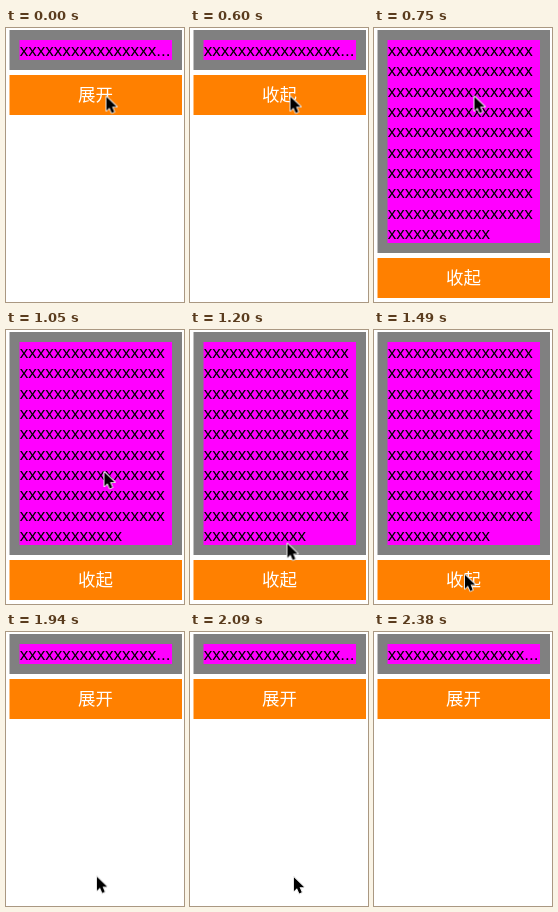
Animation of 178 by 274 pixels, one loop 2.7 s. Source, as an HTML page:

```html
<!DOCTYPE html>
<html lang="zh-CN">
<head>
<meta charset="utf-8">
<style>
  html, body { margin: 0; width: 100%; height: 100%; overflow: hidden; background: #fff; }
  .stage { position: relative; width: 178px; height: 274px; overflow: hidden; }
  .stage * { position: absolute; box-sizing: border-box; }

  .panel, .button, .open, .label, .short, .cursor { animation: 2700ms step-end infinite; }

  /* half-covered pixel column on the left edge */
  .panel, .button { left: 3px; width: 173px; height: 40px; border-left: 1px solid #ffffff80; }
  .panel { top: 2px; background: #808080; animation-name: panel; }
  .text {
    left: 9px; top: 10px; right: 10px; bottom: 10px;
    overflow: hidden; border-left: 1px solid #80808080; background: #f0f; color: #000;
    font: 17.07px/20.33px "Liberation Sans", Arial, sans-serif;
    word-break: break-all;
  }
  .text span { left: -.3px; top: 1px; width: 152px; }

  .button { top: 47px; background: #ff8000; animation-name: button; }
  .button span {
    left: -1px; top: 0; width: 173px; text-align: center; color: #fff;
    font: 17.5px/38px "Noto Sans CJK SC", "Noto Sans CJK", sans-serif;
  }

  .short { animation-name: short; }
  .open { animation-name: open; }
  .expand { animation-name: expand; }
  .collapse { animation-name: collapse; }
  .cursor { left: 0; top: 0; width: 16px; height: 22px; overflow: visible; animation-name: move; }

  @keyframes panel  { 0%, 71.851% { height: 40px } 27.777% { height: 223px } }
  @keyframes button { 0%, 71.851% { top: 47px } 27.777% { top: 230px } }
  @keyframes short  { 0%, 71.851% { visibility: visible } 27.777% { visibility: hidden } }
  @keyframes open   { 0%, 71.851% { visibility: hidden } 27.777% { visibility: visible } }
  @keyframes expand   { 0%, 71.851% { visibility: visible } 22.222% { visibility: hidden } }
  @keyframes collapse { 0%, 71.851% { visibility: hidden } 22.222% { visibility: visible } }
  @keyframes move {
    0%      { transform: translate(99.5px, 67.5px); visibility: visible }
    38.888% { transform: translate(97.5px, 141px) }
    44.444% { transform: translate(96.5px, 212.5px) }
    50%     { transform: translate(91.5px, 233px) }
    55.185% { transform: translate(90px, 243.5px) }
    77.407% { transform: translate(103px, 244px) }
    82.962% { transform: translate(146px, 258px); visibility: visible }
    88.148%, 100% { transform: translate(146px, 258px); visibility: hidden }
  }
</style>
</head>
<body>
<div class="stage">
  <div class="panel">
    <div class="text"><span class="short"></span><span class="open"></span></div>
  </div>
  <div class="button">
    <span class="label expand">展开</span>
    <span class="label collapse">收起</span>
  </div>
  <svg class="cursor" viewBox="0 0 16 22">
    <path d="M.9 1.2V15.2L4 12.2L6.3 17.4L8.8 16.3L6.6 11.2H11.2Z"
          fill="#000" stroke="#fff" stroke-width="1.8" stroke-linejoin="round" paint-order="stroke"
          style="filter: drop-shadow(0 .7px .6px rgba(0,0,0,.3))"/>
  </svg>
</div>
<script>
  const fill = (name, text) => document.querySelector(name).textContent = text;
  fill('.short', 'x'.repeat(16) + '...');
  fill('.open', 'x'.repeat(165));
</script>
</body>
</html>
```
